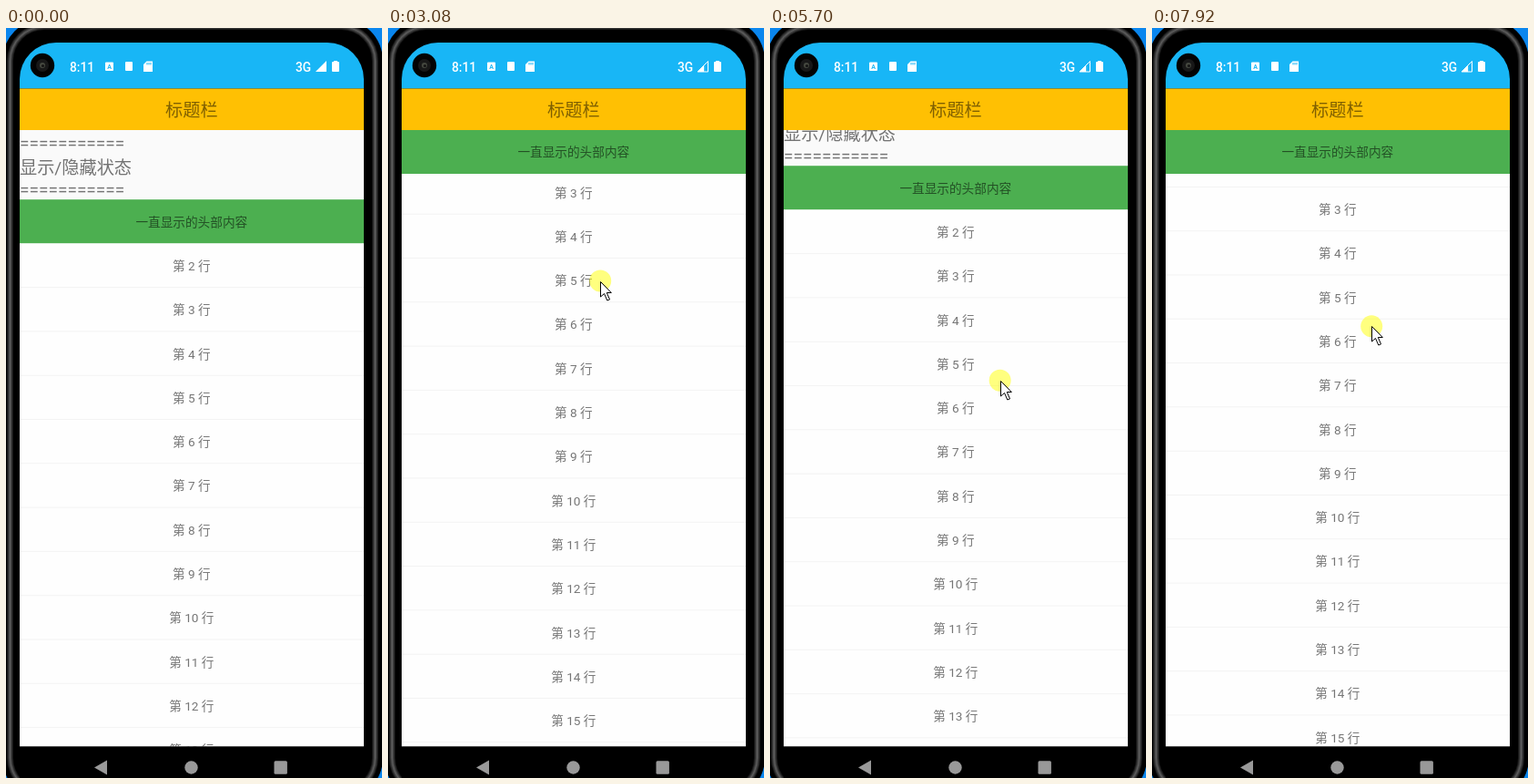
These frames come from a looping animation (413 by 823 pixels, 8 s). An HTML page with a canvas:

```html
<!DOCTYPE html>
<html lang="zh">
<head>
<meta charset="utf-8">
<title>Sticky header list</title>
<style>
html, body { margin: 0; width: 100%; height: 100%; overflow: hidden; background: #0a86ee; }
canvas { display: block; width: 413px; height: 823px; }
</style>
</head>
<body>
<canvas id="stage"></canvas>
<script>
const W = 413, H = 823, LOOP = 8000;
const LEFT = 15, TOP = 16, WIDE = 378, MID = 203.8;
const TITLE = 66.5, BAR = 112, END = 788.5;
const ROW = 48.3, STATE_H = 76.2, PRESS = 1330;
const FONT = 'Roboto, "Noto Sans CJK SC", "Noto Sans CJK", sans-serif';
const GREY = 'rgba(0,0,0,.54)';
const BLUE = '#18b6f6';

const canvas = document.getElementById('stage');
const ctx = canvas.getContext('2d');
const dpr = window.devicePixelRatio || 1;
canvas.width = W * dpr;
canvas.height = H * dpr;
ctx.scale(dpr, dpr);

const easeOut = (t, from, to, power) =>
  1 - (1 - Math.min(1, Math.max(0, (t - from) / (to - from)))) ** power;
const mix = (a, b, u) => a + (b - a) * u;

// The pointer enters, drags up, drags down past the top, then drags up again.
function pointerAt(t) {
  let x = 346, y = 762;
  const go = (from, to, nx, ny, power) => {
    const u = easeOut(t, from, to, power);
    x = mix(x, nx, u);
    y = mix(y, ny, u);
  };
  go(130, 1060, 237, 431, 3);
  go(PRESS, 3740, 232, 229, 1.1);
  go(3860, 6600, 260, 443, 1.2);
  go(6680, LOOP, 240, 320, 1);
  return { x, y };
}

function scrollAt(t) {
  const up = 186 * easeOut(t, 1600, 3740, 1);
  const down = 186 * easeOut(t, 3860, 6300, 1.15);
  const again = 118 * easeOut(t, 6800, LOOP, 1);
  return up - down + again;
}

function rect(x, y, w, h, fill) {
  ctx.fillStyle = fill;
  ctx.fillRect(x, y, w, h);
}

function round(x, y, w, h, r, fill) {
  ctx.beginPath();
  ctx.roundRect(x, y, w, h, r);
  ctx.fillStyle = fill;
  ctx.fill();
}

function disc(x, y, r, fill) {
  ctx.beginPath();
  ctx.arc(x, y, r, 0, Math.PI * 2);
  ctx.fillStyle = fill;
  ctx.fill();
}

function poly(points, fill, stroke) {
  ctx.beginPath();
  points.forEach(([x, y]) => ctx.lineTo(x, y));
  ctx.closePath();
  if (fill) {
    ctx.fillStyle = fill;
    ctx.fill();
  }
  if (stroke) {
    ctx.strokeStyle = stroke;
    ctx.lineWidth = 1;
    ctx.stroke();
  }
}

// y is the visual middle of the line
function text(str, x, y, size, { fill = GREY, align = 'center', weight = 400 } = {}) {
  ctx.font = `${weight} ${size}px ${FONT}`;
  ctx.textAlign = align;
  ctx.fillStyle = fill;
  ctx.fillText(str, x, y + size * 0.37);
}

function drawBody() {
  rect(0, 0, W, H, '#0a86ee');
  // Nested shells: black edge, soft grey rim, black bezel
  for (let inset = 0; inset <= 12; inset++) {
    const light = Math.round(95 * Math.max(0, 1 - Math.abs(inset - 8) / 4));
    round(inset - 4, inset - 10, 418 - 2 * inset, 857 - 2 * inset, 46 - inset,
      `rgb(${light},${light},${light})`);
  }
}

function drawSignal(full) {
  const left = 340, base = 48, size = 12;
  const wedge = w => [[left, base], [left + w, base - w], [left + w, base]];
  if (full) return poly(wedge(size), '#fff');
  poly(wedge(size - 0.5), null, '#fff');
  poly(wedge(size * 0.6), '#fff');
}

function drawStatus(t) {
  const label = { fill: '#fff', align: 'left', weight: 500 };
  rect(LEFT, TOP, WIDE, TITLE - TOP, BLUE);
  text('8:11', 70, 42.5, 13.8, label);

  round(109, 37.5, 9, 9.5, 1, '#fff');
  text('A', 113.5, 42.3, 7, { fill: BLUE, weight: 700 });
  round(131, 37, 8, 10, 1, '#fff');
  poly([[151, 40], [154.5, 36.5], [161, 36.5], [161, 48], [151, 48]], '#fff');
  for (let x = 154.5; x < 160; x += 2) rect(x, 38, 1, 2.4, BLUE);

  text('3G', 318, 42.5, 13.8, label);
  drawSignal(t < 500);
  round(358, 37, 8, 11, 1, '#fff');
  rect(360, 36, 4, 2, '#fff');

  disc(40, 41, 13.2, '#030303');
  disc(40, 41, 7, '#181818');
  disc(40, 41, 3, '#45483f');
  disc(40.5, 41.5, 1.6, '#141414');
}

function drawList(scroll) {
  const state = BAR - scroll;
  const first = state + STATE_H + ROW;
  ctx.save();
  ctx.beginPath();
  ctx.rect(LEFT, BAR, WIDE, END - BAR);
  ctx.clip();

  rect(LEFT, BAR, WIDE, END - BAR, '#fafafa');
  const rule = '='.repeat(11), left = { align: 'left' };
  text(rule, LEFT, state + 14, 19.1, left);
  text('显示/隐藏状态', LEFT, state + 40.7, 19.2, left);
  text(rule, LEFT, state + 64.5, 19.1, left);

  rect(LEFT, first - 1, WIDE, H, '#fefefe');
  for (let n = 2, top = first; top < END; n++, top += ROW) {
    text(`第 ${n} 行`, MID, top + 24.4, 13.6);
    rect(LEFT, top + ROW - 0.7, WIDE, 1, '#f3f3f3');
  }

  const head = Math.max(BAR, state + STATE_H);
  rect(LEFT, head, WIDE, ROW - 0.3, '#4caf50');
  text('一直显示的头部内容', MID, head + 24.4, 13.65);
  ctx.restore();
}

function drawNav() {
  const y = 811.5, r = 7.2, fill = '#999';
  rect(LEFT, END, WIDE, H - END, '#000');
  poly([[97, y], [111, y - 8], [111, y + 8]], fill);
  disc(203.5, y, r, fill);
  round(301.7 - r, y - r, 2 * r, 2 * r, 1.5, fill);
}

function drawPointer(t) {
  if (t < 130) return;
  const { x, y } = pointerAt(t);
  if (t >= PRESS) disc(x, y, 12, 'rgba(255,255,0,.5)');
  ctx.save();
  ctx.translate(Math.round(x) + 0.5, Math.round(y) + 0.5);
  poly([[0, 0], [0, 16.5], [4, 13], [7.3, 20.5], [10, 19.4], [6.8, 12], [11.8, 12]], '#fff', '#000');
  ctx.restore();
}

function draw(t) {
  drawBody();
  ctx.save();
  ctx.beginPath();
  ctx.roundRect(LEFT, TOP, WIDE, H, [40, 40, 0, 0]);
  ctx.clip();
  drawStatus(t);
  rect(LEFT, TITLE, WIDE, BAR - TITLE, '#ffc003');
  text('标题栏', MID, 89.5, 19.2, { fill: 'rgba(0,0,0,.5)' });
  drawList(scrollAt(t));
  drawNav();
  ctx.restore();
  drawPointer(t);
}

const start = performance.now();
function tick() {
  draw((performance.now() - start) % LOOP);
  requestAnimationFrame(tick);
}
tick();
</script>
</body>
</html>
```
